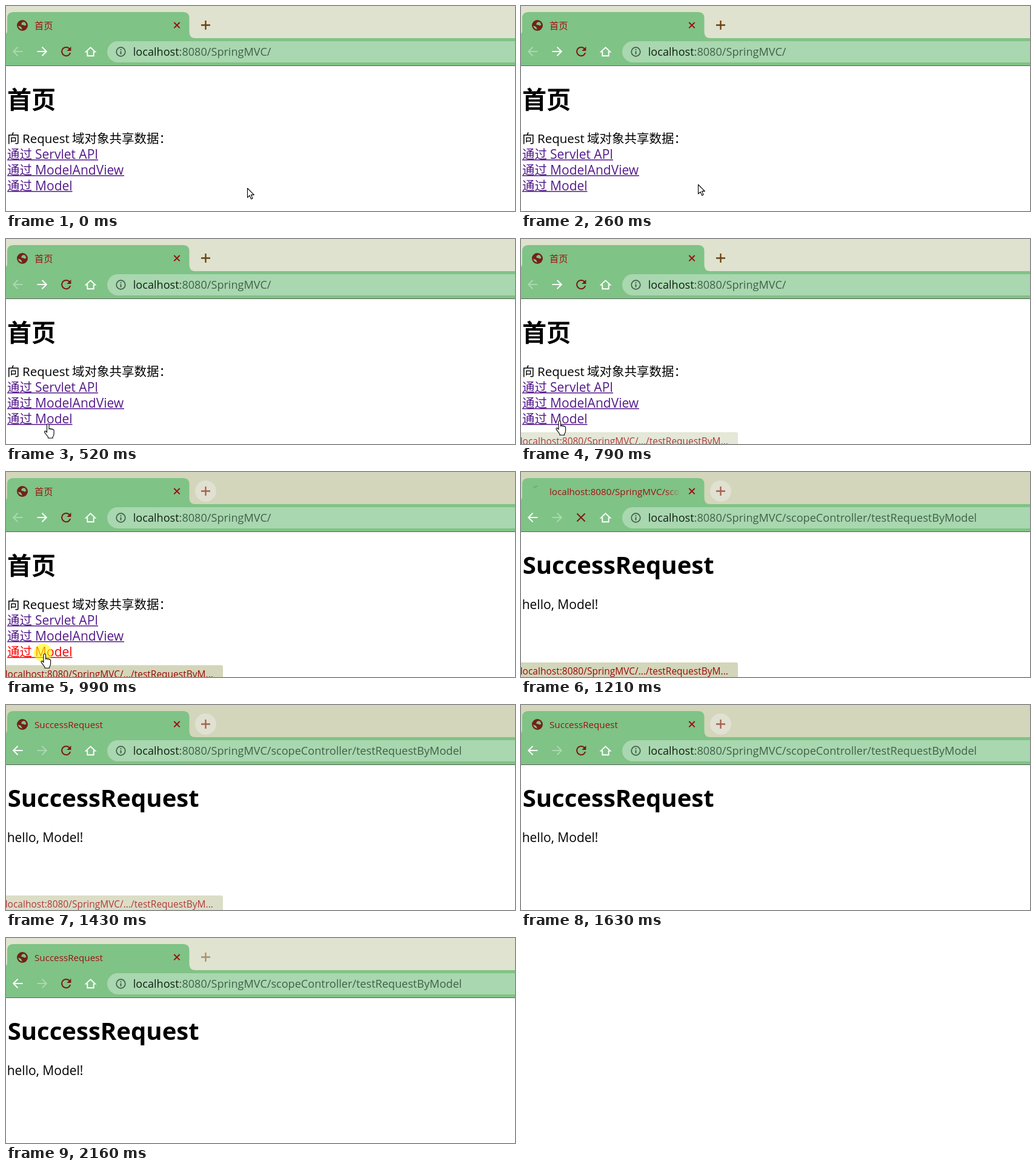
An HTML page that plays this animation: 840x338 px, repeating every 2230 ms.

```html
<!DOCTYPE html>
<html lang="zh">
<head>
<meta charset="utf-8">
<title>首页</title>
<style>
  html, body { margin: 0; width: 100%; height: 100%; overflow: hidden; background: #fff; }
  svg { display: block; width: 840px; height: 338px; }
  text { font-family: "Open Sans", "Noto Sans CJK SC", "Noto Sans CJK", sans-serif; white-space: pre; }
  .tab { font-size: 15.2px; fill: #a01010; }
  .url { font-size: 18.1px; fill: #41604a; }
  .host { fill: #111f14; }
  .body { font-size: 21px; }
  .cjk { font-size: 20.5px; }
  .h1 { font-size: 40.1px; font-weight: 700; }
  .status { font-size: 15.5px; fill: #9c0a0a; }
  .line { fill: none; stroke-width: 2; }
  .cursor { fill: #fff; stroke: #000; stroke-width: 1.1; stroke-linejoin: round; }
</style>
</head>
<body>
<svg viewBox="0 0 840 338">
  <defs>
    <linearGradient id="fade" gradientUnits="userSpaceOnUse" x1="240" x2="263">
      <stop stop-color="#a01010"/>
      <stop offset="1" stop-color="#a01010" stop-opacity="0"/>
    </linearGradient>
  </defs>
  <rect width="840" height="338" fill="#fff"/>

  <g id="home">
    <text class="h1" x="2" y="169">首页</text>
    <text class="body" y="226"><tspan class="cjk" x="2">向</tspan><tspan class="cjk" x="27">Request</tspan><tspan class="cjk" x="109">域对象共享数据：</tspan></text>
    <g id="links" fill="#551a8b"></g>
  </g>
  <g id="result">
    <text class="h1" x="2.7" y="168">SuccessRequest</text>
    <text class="body" x="1.7" y="226">hello, Model!</text>
  </g>

  <rect id="strip" width="840" height="54"/>
  <circle id="plusDisc" cx="329.5" cy="31.5" r="17.5" fill="#e0e1d2"/>
  <path id="plus" class="line" d="M322 31.5h15M329.5 24v15" style="stroke-width:2.3"/>
  <path d="M0 53V46Q2 44 2 41V20Q2 10 12 10H292.5Q302.5 10 302.5 20V43Q302.5 53 312.5 53H840V98H0z" fill="#7fc386"/>
  <rect y="98" width="840" height="1" fill="#5b605b"/>
  <rect x="167" y="58" width="720" height="35" rx="17.5" fill="#a9d7af"/>

  <g id="globe">
    <circle cx="27" cy="32" r="9" fill="#74201a"/>
    <path d="M25.5 28.5q2.5-3.5 6-1.5l2 4q-2 2.5-4.5.5l-3.5-.5zM20 32.5l4.5 1.5 2.5 4.5q-5.5-.5-7-6z" fill="#7fc386"/>
  </g>
  <path id="spinner" class="line" d="M20.5 27Q22 24 27 23.5" stroke="#74a57b"/>
  <text id="title" class="tab" x="47" y="38"></text>
  <path class="line" d="M277.3 27l9.4 9.4M286.7 27l-9.4 9.4" stroke="#9c1010"/>

  <g class="line" stroke="#fff">
    <path id="back" d="M27.5 75H12.5M19.5 67.7L12.2 75L19.5 82.3"/>
    <path id="forward" d="M51.5 75H66.5M59.5 67.7L66.8 75L59.5 82.3"/>
    <path d="M131.8 75.6L139.5 68.2L147.2 75.6H144.7V82.3H134.3V75.6z" stroke-width="1.9"/>
  </g>
  <path id="reload" transform="translate(87 62.8) scale(1.02)" fill="#7c1a14" d="M17.65 6.35A7.96 7.96 0 0 0 12 4a8 8 0 1 0 7.73 10h-2.08A6 6 0 1 1 12 6c1.66 0 3.14.69 4.22 1.78L13 11h7V4z"/>
  <path id="stop" class="line" d="M92.5 68.5l13 13M105.5 68.5l-13 13" stroke="#7c1a14"/>
  <circle class="line" cx="189.5" cy="75.5" r="7.3" stroke="#41604a" style="stroke-width:1.7"/>
  <path class="line" d="M189.5 74.5v5M189.5 71.2v1.9" stroke="#41604a"/>
  <text class="url" x="209.8" y="82"><tspan class="host">localhost</tspan>:8080/SpringMVC/<tspan id="path"></tspan></text>

  <g id="status">
    <path id="bubble" d="M0 314H355Q358 314 358 317V340H0z"/>
    <text class="status" x="-1.3" y="334">localhost:8080/SpringMVC/.../testRequestByM...</text>
  </g>
  <circle id="click" cx="61" cy="298" r="15" fill="#ff0" fill-opacity=".6"/>
  <path id="arrow" class="cursor" d="M.5.5V15.8L4 12.4L6.6 18.3L9 17.2L6.5 11.4H11.3z"/>
  <path id="hand" class="cursor" d="M-1.5 15V2.5a1.75 1.75 0 0 1 3.5 0V9.5a1.6 1.6 0 0 1 3 .3a1.6 1.6 0 0 1 2.9.6a1.3 1.3 0 0 1 2.2 1V17q0 3-2 5.5V24.3H.5V22.5L-5.3 14.8q-.6-1.6.6-2.1q1-.3 1.8.6z"/>
</svg>
<script>
const LOOP = 2230;
const el = id => document.getElementById(id);
const show = (id, on) => el(id).setAttribute('opacity', Number(on));
const paint = (id, attr, value) => el(id).setAttribute(attr, value);

el('links').innerHTML = [['Servlet API', 152], ['ModelAndView', 195], ['Model', 109.5]]
  .map(([label, right], i) => {
    const y = 252 + 26 * i;
    return `<g id="link${i}"><text class="body" y="${y}"><tspan class="cjk" x="2">通过</tspan><tspan x="48">${label}</tspan></text>
      <rect x="2" y="${y + 1}" width="${right - 2}" height="1.5"/></g>`;
  }).join('');

// Each step overrides the state from its time (ms) on.
const steps = [
  [0, { x: 398, y: 300, pointer: 'arrow', strip: '#dfe2ce', plus: '#6b3f10', active: 0,
        status: 0, drop: 4.5, click: 0, pressed: 0, title: '首页', path: '', loading: 0, globe: 1, page: 'home' }],
  [70, { x: 388, y: 298 }],
  [140, { x: 352, y: 295 }],
  [210, { x: 292, y: 294 }],
  [270, { x: 224, y: 296 }],
  [330, { x: 162, y: 300 }],
  [390, { x: 114, y: 303 }],
  [450, { x: 82, y: 304, pointer: 'hand' }],
  [520, { x: 69, y: 304 }],
  [590, { x: 63.5, y: 299 }],
  [720, { status: .35 }],
  [790, { status: .8 }],
  [860, { status: 1 }],
  [920, { strip: '#d3d6ba', plus: '#a5604e', active: 1, click: 1, pressed: 1 }],
  [1060, { click: 0 }],
  [1140, { loading: 1, globe: 0, drop: 0 }],
  [1210, { page: 'result', pointer: '', pressed: 0,
           title: 'localhost:8080/SpringMVC/sco', path: 'scopeController/testRequestByModel' }],
  [1280, { title: 'SuccessRequest', loading: 0, globe: 1 }],
  [1420, { status: .8 }],
  [1490, { status: .5 }],
  [1560, { status: .2 }],
  [1630, { status: 0 }],
  [2160, { strip: '#e0e3d0', plus: '#a89068', active: 0 }],
];

function draw(time) {
  const s = Object.assign({}, ...steps.filter(([at]) => at <= time).map(([, change]) => change));
  const onHome = s.page === 'home';
  show('home', onHome);
  show('result', !onHome);
  paint('strip', 'fill', s.strip);
  paint('bubble', 'fill', s.strip);
  paint('plus', 'stroke', s.plus);
  show('plusDisc', s.active);
  show('globe', s.globe);
  show('spinner', !s.globe);
  show('reload', !s.loading);
  show('stop', s.loading);
  show('back', onHome ? .35 : 1);
  show('forward', onHome ? 1 : .35);
  el('title').textContent = s.title;
  el('title').style.fill = s.title.length > 20 ? 'url(#fade)' : '';
  el('path').textContent = s.path;
  show('status', s.status);
  paint('status', 'transform', `translate(0 ${s.drop})`);
  paint('link2', 'fill', s.pressed ? '#f00' : '#551a8b');
  show('click', s.click);
  for (const id of ['arrow', 'hand']) {
    show(id, s.pointer === id);
    paint(id, 'transform', `translate(${s.x} ${s.y})`);
  }
}

const start = performance.now();
function tick() {
  draw((performance.now() - start) % LOOP);
  requestAnimationFrame(tick);
}
tick();
</script>
</body>
</html>
```
